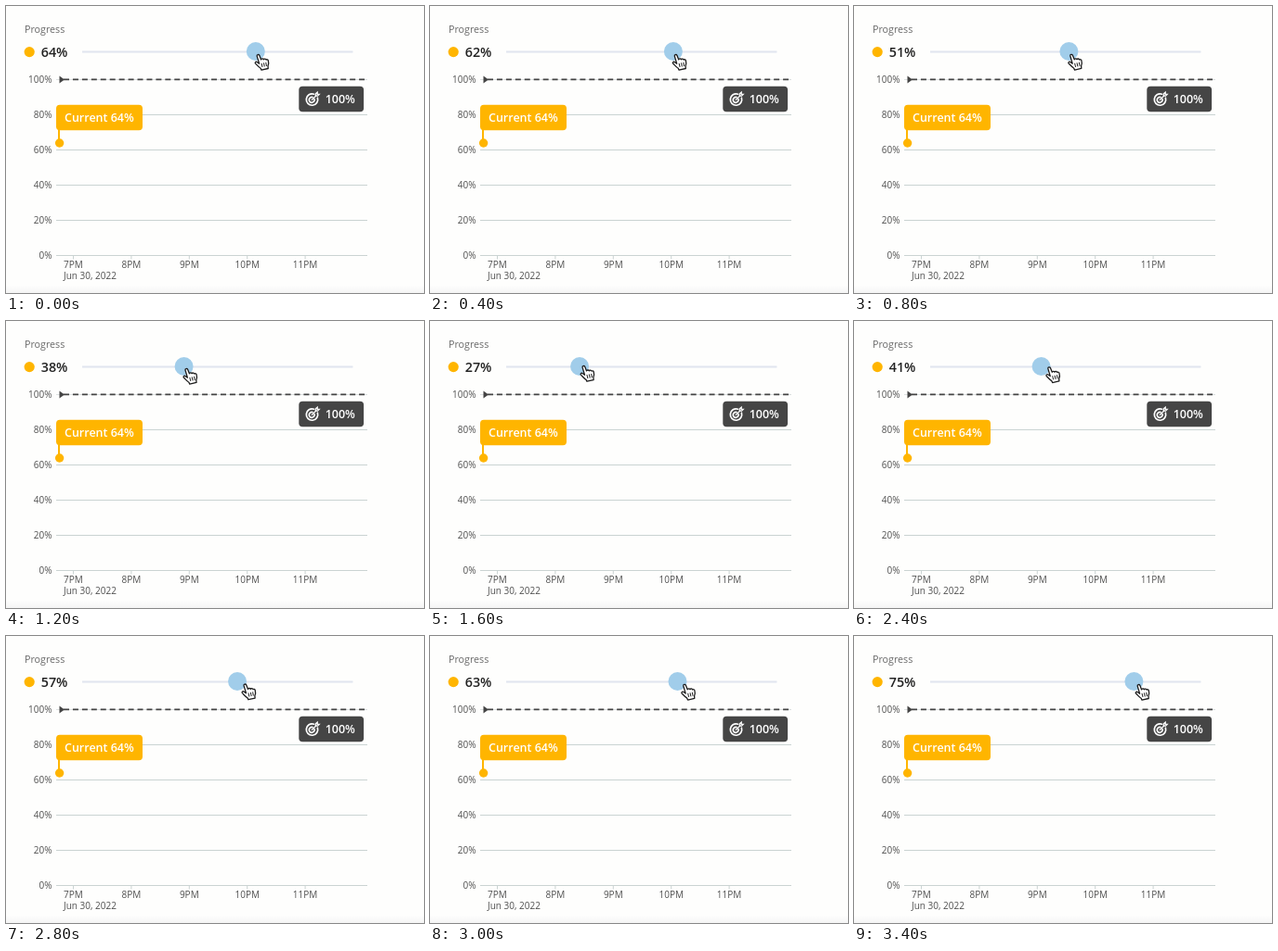
An HTML page for the animation above (3.6 s loop, 450 by 310 pixels).

```html
<!DOCTYPE html>
<html lang="en">
<head>
<meta charset="utf-8">
<title>Progress slider</title>
<style>
  html, body { margin: 0; width: 100%; height: 100%; overflow: hidden; background: #fefefd; }
  svg { display: block; width: 450px; height: 310px; font: 10px "Open Sans", sans-serif; fill: #505050; }
  .strong { font-weight: 600; font-size: 12.5px; fill: #fff; }
  #value { font-size: 14.3px; fill: #222; }
</style>
</head>
<body>
<svg viewBox="0 0 450 310">
  <defs>
    <linearGradient id="shade" x2="0" y2="1">
      <stop stop-color="#fefefd"/>
      <stop offset="1" stop-color="#f5f5f5"/>
    </linearGradient>
  </defs>
  <rect y="302" width="450" height="8" fill="url(#shade)"/>

  <text x="20" y="29.2" font-size="10.7" fill="#686868">Progress</text>
  <circle cx="25.2" cy="49.6" r="5.6" fill="#ffb500"/>
  <text id="value" x="37.8" y="55.1" class="strong"></text>

  <g id="axes"></g>
  <path d="M62 79.4H386" stroke="#444" stroke-width="1.8" stroke-dasharray="6 3.94"/>
  <path d="M57.5 75.4L63 79.4L57.5 83.4Z" fill="#444"/>

  <rect x="315.3" y="86.8" width="69.8" height="27.4" rx="4" fill="#454545"/>
  <g fill="none" stroke="#fff" stroke-width="1.7" stroke-linecap="round">
    <path d="M331.5 95.2A6.2 6.2 0 1 0 335.4 99.2"/>
    <path d="M330 98.6A2.9 2.9 0 1 0 332 100.7"/>
    <path d="M329.3 101.4L334 96.7M333.3 97.2V94.8L335.2 93.2V95.4H337.2L335.5 97.2Z" stroke-width="1.3"/>
  </g>
  <text x="343.7" y="105.2" class="strong">100%</text>

  <g fill="#ffb500">
    <path d="M56 130H58V148H56Z"/>
    <circle cx="57.6" cy="148" r="4.7"/>
    <rect x="54" y="106.7" width="93" height="27.6" rx="4"/>
  </g>
  <text x="63" y="125.4" class="strong">Current 64%</text>

  <path d="M82 49.4H373.5" stroke="#e1e5ef" stroke-width="2"/>
  <circle id="knob" cy="49" r="10" fill="#a1cdea"/>
  <g id="hand" fill="#fff" stroke="#1c1c1c" stroke-width="1.3" stroke-linejoin="round" stroke-linecap="round">
    <path d="M2.6 2.4C2.2 .8 4.5 .2 5.2 1.6L7 6.2C7.3 5 9.3 4.9 9.8 6.1C10.4 5 12 5.2 12.4 6.4C13.2 5.7 14.4 6.2 14.7 7.3C15.2 9 15.3 11.3 14.4 13.2L14.6 15.8L7.4 17.5L6.5 15.6C4.4 14.4 2.8 12.2 .9 10.4C0 9.2 1.6 7.9 2.9 9L5 10.5Z"/>
    <path d="M7.5 10.6L8.3 13.9M9.9 10.1L10.6 13.4M12.2 9.6L12.8 12.9" stroke-width="1"/>
  </g>
</svg>
<script>
const $ = id => document.getElementById(id);
const { PI, sin, cos, exp, max, floor, round } = Math;
const LOOP = 3600, STEP = 200;

let axes = "";
for (let i = 0; i <= 5; i++) {
  const y = 269.5 - 38 * i;
  axes += `<path d="M54 ${y}H389" stroke="${i < 5 ? "#cad3d2" : "#dde1e1"}"/>
    <text x="49.5" y="${y + 3.4}" text-anchor="end">${i * 20}%</text>`;
}
for (let i = 0; i < 5; i++) {
  const x = 72.5 + 62.4 * i;
  axes += `<path d="M${x} 270V273.5" stroke="#cad3d2"/>
    <text x="${x}" y="283.4" text-anchor="middle">${7 + i}PM</text>`;
}
$("axes").innerHTML = axes + '<text x="62" y="295.4">Jun 30, 2022</text>';

// Eased drag down to the left, then a steady drag back that slows near the end
function percentAt(step) {
  const back = step - 10;
  return back < 0
    ? 44.5 + 20 * cos(PI * (step - 0.5) / 9)
    : 24.8 + 8.15 * back - 2.15 * max(0, back - 4);
}

function draw(now) {
  const step = floor(now % LOOP / STEP);
  const percent = percentAt(step);
  const knobX = 82 + 2.91 * percent;
  // The hand drifts over the knob and lifts around the turning point
  const handX = knobX - 1.2 + 6 * max(0, sin(PI * (step - 7) / 11.5));
  const handY = 51.7 - 5.5 * exp(-(((step - 9.6) / 2.8) ** 2));
  $("value").textContent = round(percent) + "%";
  $("knob").setAttribute("cx", knobX);
  $("hand").setAttribute("transform", `translate(${handX} ${handY})`);
  requestAnimationFrame(draw);
}
draw(performance.now());
</script>
</body>
</html>
```
